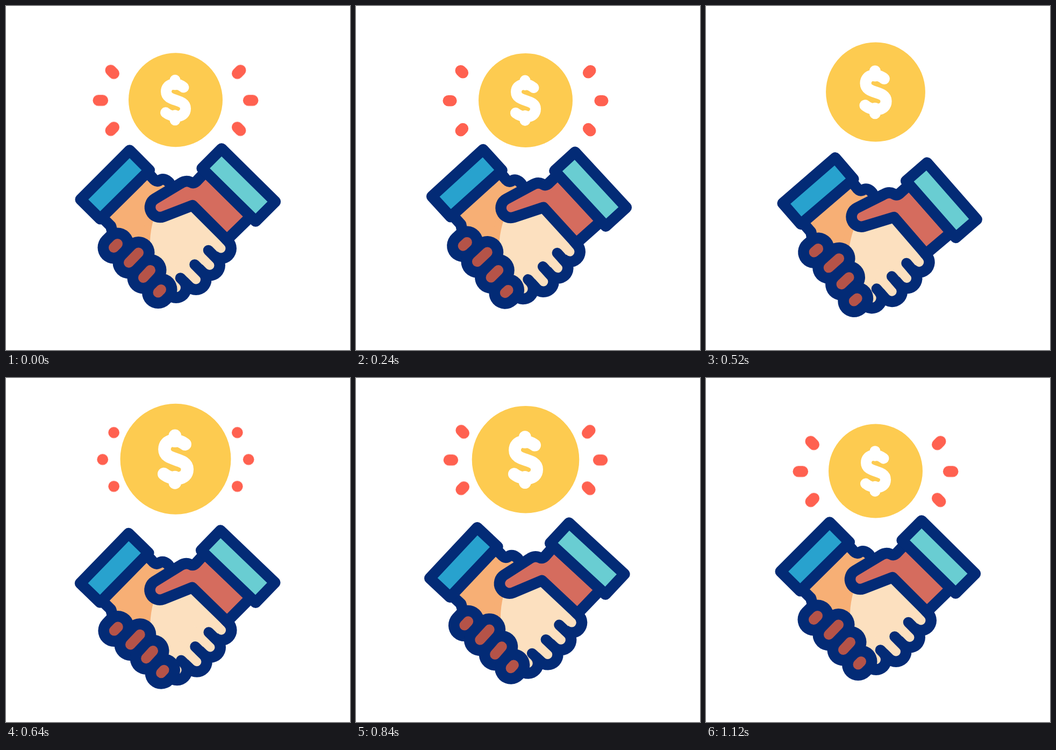
These frames come from a looping animation (640x640 px, 1160 ms). An HTML page:

```html
<!DOCTYPE html>
<html lang="en">
<head>
<meta charset="utf-8">
<title>Handshake deal</title>
<style>
  html, body { margin: 0; width: 100%; height: 100%; overflow: hidden; background: #fff; }
  svg { display: block; width: 100vw; height: 100vh; }

  :root {
    --navy: #032b76;
    --loop: 1160ms cubic-bezier(.3333, 0, .6667, 1) infinite;
  }

  .line { fill: none; stroke: var(--navy); stroke-width: 20.5; stroke-linecap: round; stroke-linejoin: round; }
  .lobe { stroke-width: 58; }
  .slot { stroke-width: 19.5; }
  .knuckle { stroke-width: 60; }
  .nail { stroke: #b55348; stroke-width: 19; }
  .tip { stroke: #fce0bf; stroke-width: 17; }
  .sign { stroke: #fff; stroke-width: 20; }

  .hands {
    transform-origin: 320px 408.5px;
    animation: dip var(--loop), tilt var(--loop);
  }
  /* Fingers squeeze one after another. */
  .knuckle, .nail {
    animation: squeeze var(--loop);
    animation-delay: calc(var(--i) * 80ms - 1160ms);
  }
  .lift { animation: lift var(--loop); animation-delay: -1060ms; }
  .coin { transform-origin: 315.5px 175.4px; animation: swell var(--loop); }
  .spark {
    stroke: #ff6150;
    stroke-width: 20.6;
    stroke-dasharray: 1 3;
    animation: trim var(--loop), blink 1160ms step-end infinite;
  }

  @keyframes dip {
    0%, 13.97% { translate: 0 0; }
    44.66%, 51.2% { translate: 0 20px; }
    86%, 100% { translate: 0 0; }
  }
  @keyframes tilt {
    0%, 11.1% { rotate: 0deg; }
    34.4% { rotate: 7deg; }
    63.8% { rotate: -2.8deg; }
    86.2%, 100% { rotate: 0deg; }
  }
  @keyframes squeeze {
    0%, 17.2% { translate: 0 0; }
    37.9% { translate: 4.2px -4.2px; }
    58.6%, 100% { translate: 0 0; }
  }
  @keyframes lift {
    0%, 17.4% { translate: 0 0; }
    50.8%, 57.3% { translate: 0 -25.75px; }
    95.1%, 100% { translate: 0 0; }
  }
  @keyframes swell {
    0%, 36.6% { scale: 1; }
    60.3%, 63.8% { scale: 1.2; }
    87.9%, 100% { scale: 1; }
  }
  /* The inner end retracts outwards, then the stroke regrows from inside. */
  @keyframes trim {
    0%, 13.8% { stroke-dashoffset: 0; }
    32.3%, 40% { stroke-dashoffset: .99; }
    40.01%, 54.3% { stroke-dashoffset: -.99; }
    78.4%, 100% { stroke-dashoffset: 0; }
  }
  @keyframes blink {
    0% { opacity: 1; }
    32.7% { opacity: 0; }
    54.3%, 100% { opacity: 1; }
  }
</style>
</head>
<body>
<svg viewBox="0 0 640 640">
  <g class="lift">
    <path class="line spark" pathLength="1" d="M194.8 120.2L200.7 126.2"/>
    <path class="line spark" pathLength="1" d="M171.8 176.3H179.8"/>
    <path class="line spark" pathLength="1" d="M194.8 232.2L200.7 226.2"/>
    <path class="line spark" pathLength="1" d="M436.2 120.2L430.3 126.2"/>
    <path class="line spark" pathLength="1" d="M459.2 176.3H451.2"/>
    <path class="line spark" pathLength="1" d="M436.2 232.2L430.3 226.2"/>
    <g class="coin">
      <circle cx="315.5" cy="175.4" r="87.5" fill="#fdcb50"/>
      <path class="line sign" d="M330.5 152C318 142 298 144 298 160C298 180 334 172 334 191.500C334 210 309 209 297 199M314.5 138.5V147M314.5 204V213"/>
    </g>
  </g>

  <g class="hands">
    <!-- left forearm -->
    <path fill="#f7af75" d="M178 390L262 308L279 326L294 322L306 332L296 440L240 450L196 411Z"/>
    <path class="line" d="M260 306L272 319Q279 328 285 325Q294 318 304 329M180 394.5L195 409.5L199 425"/>

    <!-- palm and fingertips -->
    <path class="line lobe" d="M400 451l-30 -30M379 482.5l-30 -30M353.5 509l-30 -30M316.5 524l-20 -20"/>
    <path fill="#f7af75" d="M262 385H290V450H250Z"/>
    <path fill="#fce0bf" d="M275 395L347 373L406 446L317 523L262 475L268 437Q268.5 418 275 395Z"/>
    <path class="line tip" d="M400 451l-30 -30M379 482.5l-30 -30M353.5 509l-30 -30M316.5 524l-20 -20"/>
    <path class="line slot" d="M376.5 454.5l18 18M351 481l19 19M324.5 506l16 16"/>

    <!-- wrapped fingers -->
    <path class="line knuckle" style="--i: 0" d="M200.5 449.5L207.5 442.5"/>
    <path class="line knuckle" style="--i: 1" d="M228.5 477.5L246.5 459"/>
    <path class="line knuckle" style="--i: 2" d="M255.5 505.5L268.5 491.5"/>
    <path class="line knuckle" style="--i: 3" d="M283 533L288.5 527.5"/>
    <path class="line nail" style="--i: 0" d="M200.5 449.5L207.5 442.5"/>
    <path class="line nail" style="--i: 1" d="M228.5 477.5L246.5 459"/>
    <path class="line nail" style="--i: 2" d="M255.5 505.5L268.5 491.5"/>
    <path class="line nail" style="--i: 3" d="M283 533L288.5 527.5"/>

    <!-- right forearm and thumb -->
    <path class="line" style="fill: #d56c5e" d="M371 308.500L354 326.500Q349 331 343 327.5Q334 323.5 324 330.5L277 358.6A18.5 18.5 0 0 0 293 391.8L347 371L411 435L456 391Z"/>

    <!-- cuffs -->
    <path class="line" style="fill: #28a2ce" d="M138.7 360L230 268.5L266.8 305.5L175.2 396.3Z"/>
    <path class="line" style="fill: #69cdd2" d="M401 265.4L501 364L464.5 400.6L364.6 302Z"/>
  </g>
</svg>
</body>
</html>
```
